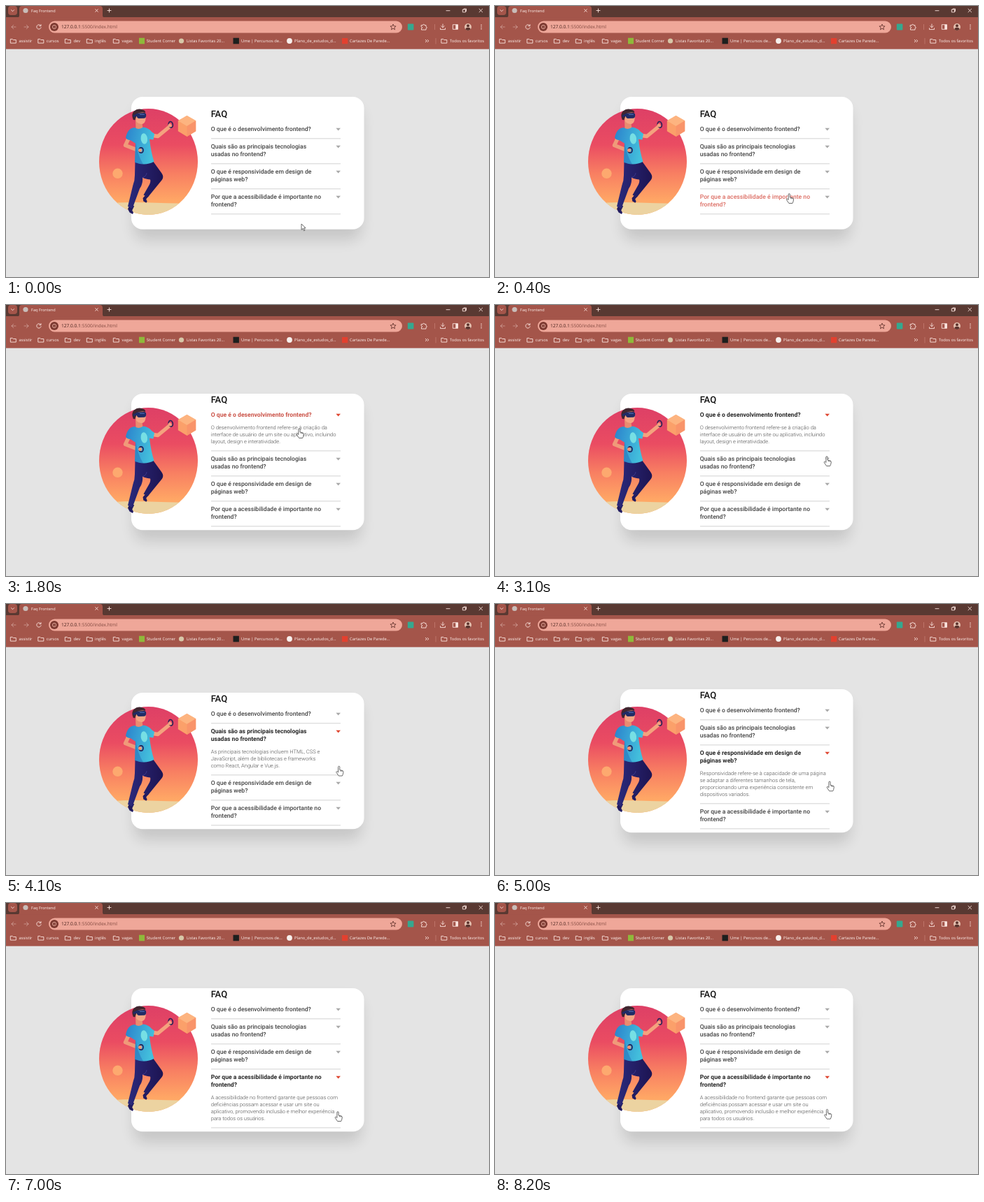
Recreate the animation shown at these times as an HTML page. Size 690 by 388 pixels, loop 8300 ms.

```html
<!DOCTYPE html>
<html lang="pt-BR">
<head>
<meta charset="utf-8">
<title>FAQ</title>
<style>
  html, body { margin: 0; width: 100%; height: 100%; overflow: hidden; background: #e4e4e4; }
  svg { display: block; width: 690px; height: 388px; text-rendering: geometricPrecision; }
  .ui { font: 5.8px "Open Sans", "Noto Sans", sans-serif; fill: #fff3ef; }
  .line { fill: none; stroke: #fbe4de; stroke-width: .9; stroke-linecap: round; stroke-linejoin: round; }
  .faq { font-family: Roboto, Arial, sans-serif; }
  .head { font-size: 13px; font-weight: 500; fill: #111; }
  .ask { font-size: 8.62px; font-weight: 500; fill: #424242; }
  .ask.open { font-weight: 600; fill: #262626; }
  .ask.hot { fill: #dc6c62; }
  .ask.open.hot { fill: #cb5348; }
  .reply { font-size: 7.57px; font-weight: 300; fill: #4c4c4c; }
</style>
</head>
<body>
<svg id="stage" viewBox="0 0 690 388">
  <defs>
    <linearGradient id="sky" x1="0" y1="0" x2="0" y2="1">
      <stop offset="0" stop-color="#dd3f66"/><stop offset=".34" stop-color="#ea4c62"/>
      <stop offset=".6" stop-color="#f87f62"/><stop offset=".85" stop-color="#ffa765"/>
    </linearGradient>
    <linearGradient id="shirt" x1="0" y1="0" x2="1" y2=".25">
      <stop offset="0" stop-color="#2b82cc"/><stop offset="1" stop-color="#43bfdc"/>
    </linearGradient>
    <linearGradient id="pants" x1="0" y1="0" x2="1" y2="0">
      <stop offset="0" stop-color="#2b2a7c"/><stop offset="1" stop-color="#1d1452"/>
    </linearGradient>
    <clipPath id="disc"><ellipse cx="203.5" cy="223" rx="70.5" ry="76"/></clipPath>
    <filter id="soft" x="-20%" y="-20%" width="140%" height="150%"><feGaussianBlur stdDeviation="10"/></filter>
    <path id="folder" class="line" d="M-3.8 -2.6h2.6l1 1.1h4v4.6h-7.6z"/>
  </defs>

  <rect width="690" height="388" fill="#e4e4e4"/>

  <!-- browser window -->
  <rect width="690" height="17" fill="#593932"/>
  <rect y="16" width="690" height="45.700" fill="#a4554a"/>
  <path d="M16 16.500q3 0 3-3V4q0-4 4-4H134q4 0 4 4v9.500q0 3 3 3z" fill="#a4554a"/>
  <rect x="3" y="0" width="13" height="13" rx="4" fill="#a4554a"/>
  <path class="line" d="M7.500 5.700l2 2 2-2M127.700 4.700l3.600 3.600m0-3.600l-3.600 3.600M145 6.500h5M147.500 4v5M629 6.700h5M676 4.200l4.600 4.600m0-4.600l-4.600 4.600M652.700 5h3.800v3.800h-3.800zM654 5v-1h3.500v3.700h-1"/>
  <circle cx="28" cy="6.500" r="3.600" fill="#c9bdb9"/>
  <text class="ui" x="36" y="8.700" style="font-size:5.6px">Faq Frontend</text>

  <g opacity=".45"><path class="line" d="M14 30H8m2.700-2.800L8 30l2.700 2.800M26 30h6m-2.700-2.800L32 30l-2.700 2.800"/></g>
  <path class="line" d="M49.400 27.800a3.200 3.200 0 1 0 .7 3M50 26.600v2h-2.100"/>
  <rect x="61" y="21.400" width="505" height="17.200" rx="8.600" fill="#efa799"/>
  <circle cx="69" cy="30" r="6" fill="#7d3a31"/>
  <circle cx="69" cy="30" r="2.700" fill="none" stroke="#efb5a9" stroke-width=".8"/>
  <path d="M69 29.700v1.700M69 28.300v.5" stroke="#efb5a9" stroke-width=".7"/>
  <text class="ui" x="79" y="32.400" style="font-size:6.6px;fill:#44201b">127.0.0.1<tspan fill="#824a41">:5500/index.html</tspan></text>
  <path id="star" fill="none" stroke="#5b2c26" stroke-width=".8" stroke-linejoin="round"/>
  <rect x="573.800" y="25.600" width="8.600" height="8.800" rx="1" fill="#35a88f"/>
  <path class="line" d="M593.500 27.500h2a1.200 1.200 0 0 1 2.400 0h2.100v2.200a1.200 1.200 0 0 1 0 2.400v2h-6.500v-2.200a1.100 1.100 0 0 0 0-2.200z"/>
  <path class="line" d="M624 26v4.800m-2.200-2.200l2.200 2.200 2.200-2.200M620.500 31.800v1.800h7v-1.800M638.700 26.700h6.800v6.600h-6.800z"/>
  <rect x="642.300" y="26.700" width="3.200" height="6.600" fill="#fbe4de"/>
  <circle cx="660" cy="30" r="5" fill="#e3bfae"/>
  <path d="M656.200 33.200a3.900 3.200 0 0 1 7.600 0a5 5 0 0 1-7.600 0z" fill="#5b332d"/>
  <circle cx="660" cy="28.300" r="2" fill="#5b332d"/>
  <g fill="#fbe4de"><circle cx="679" cy="27.300" r=".8"/><circle cx="679" cy="30" r=".8"/><circle cx="679" cy="32.700" r=".8"/></g>
  <g id="marks"></g>
  <rect x="190" y="45.700" width="8" height="8.600" fill="#8fb93a"/>
  <circle cx="250.500" cy="50" r="3.600" fill="#d7c7a8"/>
  <rect x="324.500" y="45.700" width="8.400" height="8.600" fill="#1d1f1e"/>
  <circle cx="405" cy="50" r="3.900" fill="#f7efec"/>
  <rect x="480" y="46" width="8.200" height="8.200" fill="#e3402f"/>
  <path class="line" d="M599.300 48.300l1.700 1.700-1.700 1.700m2.700-3.400l1.700 1.700-1.700 1.700"/>
  <path d="M614 46v8.500M612.500 26v8" stroke="#c98378" stroke-width=".7"/>

  <!-- card -->
  <rect id="shade" x="183" width="324.500" rx="16" fill="#000" opacity=".13" filter="url(#soft)"/>
  <rect id="card" x="179" width="332.500" rx="16" fill="#fff"/>

  <!-- illustration -->
  <g clip-path="url(#disc)">
    <rect x="130" y="145" width="148" height="158" fill="url(#sky)"/>
    <path d="M130 284q36-4 74-2.500T278 283v20H130z" fill="#ecd3a1"/>
  </g>
  <circle cx="159.500" cy="239.800" r="7.200" fill="#fda96f"/>
  <path d="M258.500 157l12.700 7.300v15l-12.700 7.700-12.700-7.700v-15z" fill="#fba06a"/>
  <path d="M258.500 157l12.700 7.300-12.700 7.700-12.700-7.700z" fill="#fdb480"/>
  <path d="M258.500 172l12.700-7.700v15l-12.700 7.700z" fill="#f9946a"/>

  <g stroke-linecap="round" stroke-linejoin="round">
    <path d="M201 269l-5.500 6 .8 4.500 4 2.200 1.400-1.700-1.500-3.500 4-5z" fill="#211b60"/>
    <path d="M177.500 284l-3.500 6.500 2.500 5 4.500 2.500 1-2.200-1.800-3.300 3-6z" fill="#211b60"/>
    <path d="M184.500 221q13 5 25 .5l13 18q3.500 5 .3 9.500L202.500 274l-6-3.500 8.500-15q2-4 1-7-8-1-11-3 1 9-4 16L180.500 290l-6.500-3 7.500-31q2.500-6 2.500-14z" fill="url(#pants)"/>
    <path d="M195 245.500q5-1 6-6" fill="none" stroke="#46429a" stroke-width=".7"/>
    <path d="M206 185l11 1.500 17-14" fill="none" stroke="#f4a27e" stroke-width="5.400"/>
    <path d="M174.500 191l-4 8.500 18 7" fill="none" stroke="#f09a79" stroke-width="5.400"/>
    <path d="M185 163h9l1.500 13q-5 4-10 0z" fill="#e88d70"/>
    <path d="M184 174q6 4 12-.5 8 1 12 6.500l4 3-1.500 8.500-5.500-.8q2 18 6.500 32-13 7-27.500 1l1-27-7-4.500q-6-.5-7-4 2-9 7-12.500 3-1.500 6-1.700z" fill="url(#shirt)"/>
    <path d="M185 196l-1 28q6 2.500 12 2.500-8-13-11-30.500z" fill="#2468b4" opacity=".45"/>
    <ellipse cx="197.300" cy="190" rx="4.700" ry="7.800" fill="#76dfe4" transform="rotate(-6 197.300 190)"/>
    <path d="M183.500 155q1-4 8-4t8 6q1 9-3.500 11.500-5 2-9.500-2.500z" fill="#f5a582"/>
    <path d="M181.800 163q-3.500-8 1.200-12.500 5-5 12.500-2 4 1.300 3.700 4.300-8-1-12 1.500-1 5-3 9z" fill="#40262f"/>
    <path d="M181.700 156.500l6-3 9.800-.5q2.700.3 2.700 3.200 0 4-2.700 4.500l-8 .3q-2.500-.5-2.700-3l-4.800 1.300z" fill="#202b66"/>
    <path d="M191.500 155.300h6" stroke="#5574bd" stroke-width="1"/>
    <ellipse cx="235.300" cy="169.800" rx="3" ry="4.300" fill="none" stroke="#292457" stroke-width="1.700" transform="rotate(-12 235.300 169.800)"/>
    <circle cx="234" cy="171" r="2.500" fill="#f4a27e"/>
    <ellipse cx="193" cy="206.500" rx="3" ry="3.700" fill="none" stroke="#232258" stroke-width="1.700"/>
    <circle cx="191.500" cy="206.500" r="2.500" fill="#f09a79"/>
  </g>

  <g id="list" class="faq"></g>

  <g id="cursor" stroke="#5a5a5a" stroke-width=".9" stroke-linejoin="round" fill="#fff">
    <path id="arrow" d="M0 0v8.400l2-1.900 1.500 3.300 1.500-.7-1.500-3.200h2.700z"/>
    <path id="hand" d="M-1.100 .900q0-1.200 1.100-1.200t1.100 1.200v4.200l4 .9q1.300.4 1.200 1.900l-.6 3.300-1 2.300H-.4l-3.200-4.700q-.6-1.100.3-1.600.8-.3 2.200 1.300z M2.600 5.500v1.800M4.500 6v1.500"/>
  </g>
</svg>
<script>
const LOOP = 8300, STEP = 100, LEFT = 292.7;
const $ = id => document.getElementById(id);

function add(parent, tag, attrs, text) {
  const el = document.createElementNS("http://www.w3.org/2000/svg", tag);
  for (const key in attrs) el.setAttribute(key, attrs[key]);
  if (text) el.textContent = text;
  parent.append(el);
  return el;
}

// bookmarks bar: [text x, label, folder x]
[
  [18.6, "assistir", 10.5], [57.7, "cursos", 50], [96.5, "dev", 88.5],
  [127, "inglês", 119.5], [165.5, "vagas", 157.5],
  [200.8, "Student Corner"], [258, "Listas Favoritas 20..."],
  [336, "Ume | Percursos de..."], [412, "Plano_de_estudos_d..."],
  [491, "Cartazes De Parede..."], [634, "Todos os favoritos", 626]
].forEach(([x, label, folder]) => {
  add($("marks"), "text", { class: "ui", x, y: 52.1 }, label);
  if (folder) add($("marks"), "use", { href: "#folder", x: folder, y: 50 });
});

$("star").setAttribute("d", "M" + Array.from({ length: 10 }, (_, i) => {
  const a = i * Math.PI / 5, r = i % 2 ? 1.9 : 4.3;
  return `${553 + r * Math.sin(a)} ${30.3 - r * Math.cos(a)}`;
}).join("L") + "z");

// y is the middle of the first line, rule the divider, both with everything closed
const items = [
  { y: 176.3, rule: 190, width: 143, ask: ["O que é o desenvolvimento frontend?"],
    reply: ["O desenvolvimento frontend refere-se à criação da",
      "interface de usuário de um site ou aplicativo, incluindo",
      "layout, design e interatividade."] },
  { y: 201.3, rule: 226, width: 137, ask: ["Quais são as principais tecnologias", "usadas no frontend?"],
    reply: ["As principais tecnologias incluem HTML, CSS e",
      "JavaScript, além de bibliotecas e frameworks",
      "como React, Angular e Vue.js."] },
  { y: 237.3, rule: 262, width: 144, ask: ["O que é responsividade em design de", "páginas web?"],
    reply: ["Responsividade refere-se à capacidade de uma página",
      "se adaptar a diferentes tamanhos de tela,",
      "proporcionando uma experiência consistente em",
      "dispositivos variados."] },
  { y: 273.3, rule: 298, width: 158, ask: ["Por que a acessibilidade é importante no", "frontend?"],
    reply: ["A acessibilidade no frontend garante que pessoas com",
      "deficiências possam acessar e usar um site ou",
      "aplicativo, promovendo inclusão e melhor experiência",
      "para todos os usuários."] }
];

const list = $("list");
const head = add(list, "text", { class: "head", x: LEFT, y: 159.2 }, "FAQ");
const lines = (parent, texts, y, gap) =>
  texts.forEach((text, i) => add(parent, "text", { x: LEFT, y: y + i * gap }, text));

for (const item of items) {
  item.box = add(list, "g", {});
  item.label = add(item.box, "g", {});
  lines(item.label, item.ask, item.y + 3, 10.9);
  item.mark = add(item.box, "path", { d: `M471.4 ${item.y - 1.6}h6.6l-3.3 3.8z` });
  item.body = add(item.box, "g", { class: "reply" });
  lines(item.body, item.reply, item.y + (item.ask.length - 1) * 10.9 + 21, 9.8);
  item.line = add(list, "rect", { x: 293, width: 185, height: .9, fill: "#cdcdcd" });
}

const opened = [[0, -1], [1800, 0], [3500, 1], [5000, 2], [6900, 3]];
const pointer = [
  [0, 422, 312], [100, 422, 312], [900, 416.5, 176], [1400, 416.5, 176], [1800, 419, 177],
  [2100, 419, 177], [3000, 474, 217], [3700, 474, 217], [4600, 478, 254.3], [5400, 478, 254.3],
  [6300, 474, 299], [7800, 474, 299], [7900, 474.5, 299.5], [8100, 474.5, 299.5], [8200, 474.5, 295.7]
];

function pointerAt(t) {
  const i = pointer.findIndex(p => p[0] > t);
  if (i < 0) return pointer[pointer.length - 1].slice(1);
  const [t0, x0, y0] = pointer[i - 1], [t1, x1, y1] = pointer[i];
  const k = (t - t0) / (t1 - t0), e = k * k * (3 - 2 * k);
  return [x0 + (x1 - x0) * e, y0 + (y1 - y0) * e];
}

function draw(t) {
  const open = opened.filter(s => s[0] <= t).pop()[1];
  const extra = open < 0 ? 0 : items[open].reply.length * 10 + 8;
  const half = extra / 2;
  const [x, y] = pointerAt(t);

  const top = Math.min(130, 146 - half), bottom = Math.max(319.7, 303.2 + half);
  for (const [id, dy] of [["card", 0], ["shade", 15]]) {
    $(id).setAttribute("y", top + dy);
    $(id).setAttribute("height", bottom - top);
  }
  head.setAttribute("transform", `translate(0 ${-half})`);

  items.forEach((item, i) => {
    const on = i === open, shift = open >= 0 && i > open ? half : -half;
    const start = item.y + shift;
    const over = x > LEFT && x < LEFT + item.width && Math.abs(y - start - (item.ask.length - 1) * 5.4) < item.ask.length * 5.5;
    const hot = over || (on && i === 0 && t < 2200);
    item.box.setAttribute("transform", `translate(0 ${shift})`);
    item.label.setAttribute("class", "ask" + (on ? " open" : "") + (hot ? " hot" : ""));
    item.mark.setAttribute("fill", on ? "#df4630" : "#a9a9a9");
    item.body.setAttribute("display", on ? "inline" : "none");
    item.line.setAttribute("y", item.rule - .6 + (on ? half : shift));
  });

  const onList = y < 298 + half;
  $("cursor").setAttribute("transform", `translate(${x} ${y})`);
  $("hand").setAttribute("display", onList ? "inline" : "none");
  $("arrow").setAttribute("display", onList ? "none" : "inline");
}

const begin = performance.now();
let shown = -1;
function tick() {
  const t = Math.floor((performance.now() - begin) % LOOP / STEP) * STEP;
  if (t !== shown) draw(shown = t);
  requestAnimationFrame(tick);
}
tick();
</script>
</body>
</html>
```
